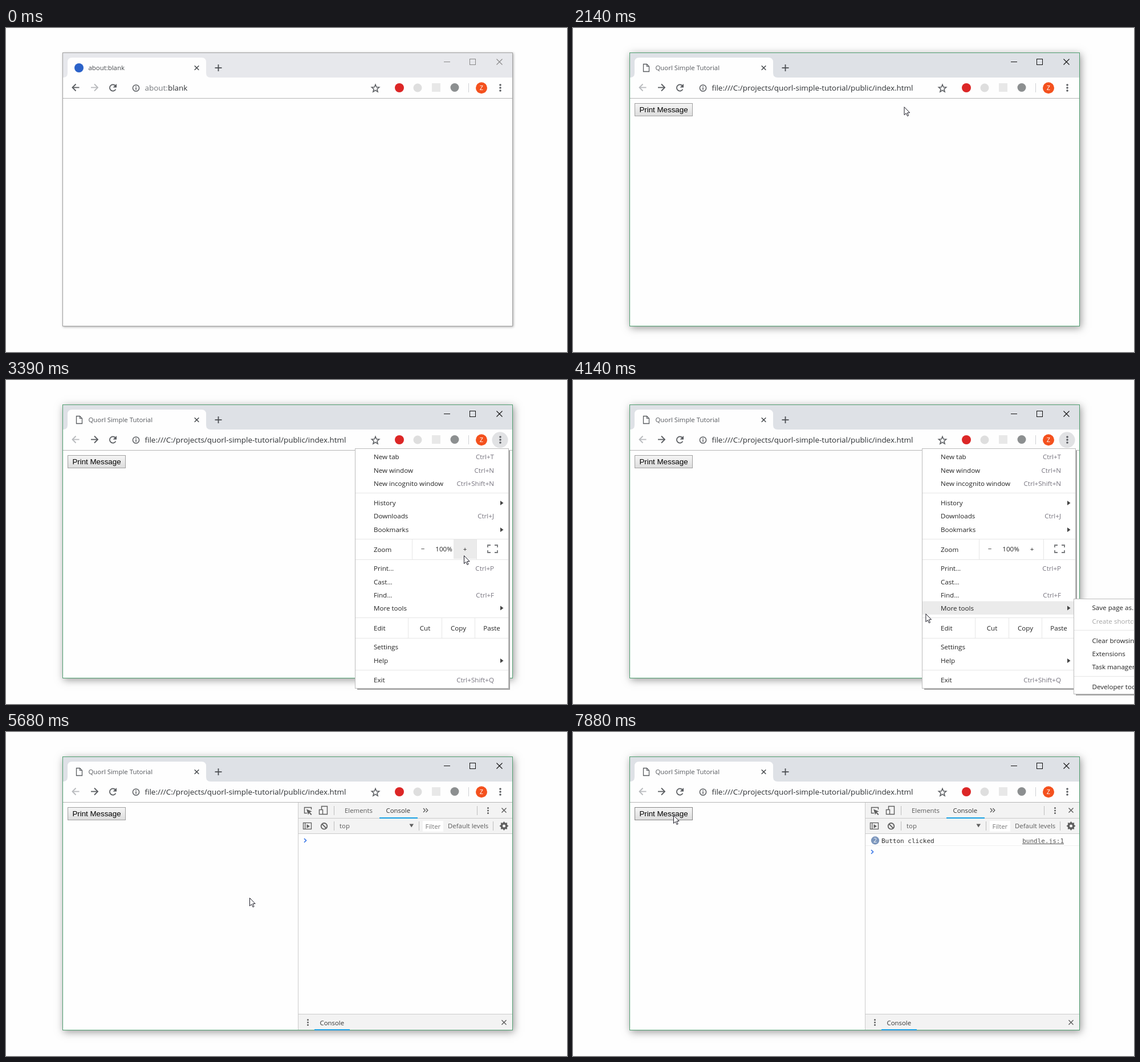
An HTML page with a canvas that plays this animation: 984 px wide and 569 px high, repeating every 8 s.

```html
<!DOCTYPE html>
<html lang="en">
<head>
<meta charset="utf-8">
<title>Browser demo</title>
<style>
  html, body { margin: 0; width: 100%; height: 100%; overflow: hidden; background: #fefefe; }
  canvas { display: block; }
</style>
</head>
<body>
<canvas id="stage" width="984" height="569"></canvas>
<script>
const ctx = document.getElementById('stage').getContext('2d');
const LOOP = 8000;
const UI = '"Open Sans", "Noto Sans", sans-serif';
const MONO = '"DejaVu Sans Mono", monospace';
const ARIAL = '"Liberation Sans", Arial, sans-serif';
const ICON = '#5a5d61';

// ---- drawing helpers ----
function rect(x, y, w, h, color) {
  ctx.fillStyle = color;
  ctx.fillRect(x, y, w, h);
}
function frame(x, y, w, h, color, width = 1) {
  ctx.strokeStyle = color;
  ctx.lineWidth = width;
  ctx.strokeRect(x, y, w, h);
}
function path(points, closed) {
  ctx.beginPath();
  points.forEach(([x, y]) => ctx.lineTo(x, y));
  if (closed) ctx.closePath();
}
function line(points, color, width = 1, closed = false) {
  path(points, closed);
  ctx.strokeStyle = color;
  ctx.lineWidth = width;
  ctx.stroke();
}
function shape(points, color) {
  path(points, true);
  ctx.fillStyle = color;
  ctx.fill();
}
function disc(x, y, r, color) {
  ctx.beginPath();
  ctx.arc(x, y, r, 0, 7);
  ctx.fillStyle = color;
  ctx.fill();
}
function ring(x, y, r, color, width, from = 0, to = 2 * Math.PI) {
  ctx.beginPath();
  ctx.arc(x, y, r, from, to);
  ctx.strokeStyle = color;
  ctx.lineWidth = width;
  ctx.stroke();
}
// y is the middle of the capital letters
function text(s, x, y, { size = 11.6, color = '#222', align = 'left', font = UI } = {}) {
  ctx.font = `${size}px ${font}`;
  ctx.fillStyle = color;
  ctx.textAlign = align;
  ctx.fillText(s, x, y + size * 0.36);
}
function cross(x, y, r, color, width) {
  line([[x - r, y - r], [x + r, y + r]], color, width);
  line([[x - r, y + r], [x + r, y - r]], color, width);
}
function plus(x, y, r, color, width) {
  line([[x - r, y], [x + r, y]], color, width);
  line([[x, y - r], [x, y + r]], color, width);
}
function dots(x, y, gap, r, color) {
  for (const k of [-1, 0, 1]) disc(x, y + k * gap, r, color);
}
function arrow(x, y, dir, color) {
  line([[x - 6 * dir, y], [x + 6 * dir, y]], color, 1.8);
  line([[x, y - 6], [x + 6 * dir, y], [x, y + 6]], color, 1.8);
}
const star = (x, y, outer, inner, n) => Array.from({ length: 2 * n }, (_, i) => {
  const r = i % 2 ? inner : outer, a = i * Math.PI / n - Math.PI / 2;
  return [x + r * Math.cos(a), y + r * Math.sin(a)];
});

// ---- pointer: [start, end, x, y, bend]; each move begins where the last one ended ----
const MOVES = [
  [0, 0, 875, 540], [140, 940, 176, 148], [980, 1480, 169, 139], [1700, 2490, 844, 98, 8],
  [2490, 2550, 860, 103], [2550, 3330, 803, 308], [3390, 4190, 617, 411],
  [4270, 4700, 950, 531], [4900, 5680, 427, 291], [5740, 6540, 176, 146]
];
const ease = p => p < 0.5 ? 2 * p * p : 1 - 2 * (1 - p) ** 2;
const clamp = p => Math.min(1, Math.max(0, p));

function pointerAt(t) {
  let x = 0, y = 0;
  for (const [start, end, toX, toY, bend = 1] of MOVES) {
    if (t < start) break;
    const p = end > start ? ease(clamp((t - start) / (end - start))) : 1;
    x += (toX - x) * p;
    y += (toY - y) * p ** bend;
  }
  return { x, y };
}
function drawPointer({ x, y }) {
  const points = [[0, 0], [0, 14], [3.2, 11], [5.6, 16], [7.6, 15], [5.3, 10.2], [9.6, 10]]
    .map(([dx, dy]) => [x + dx + 0.5, y + dy + 0.5]);
  shape(points, '#fff');
  line(points, '#1b1b26', 1, true);
}

// ---- browser window ----
function drawWindow(t) {
  const focused = t >= 980, loaded = t >= 1100;
  const glow = clamp((t - 980) / 500);
  ctx.save();
  ctx.shadowColor = `rgba(0,0,0,${0.35 + 0.05 * glow})`;
  ctx.shadowBlur = 4 + 9 * glow;
  ctx.shadowOffsetX = 1 + glow;
  ctx.shadowOffsetY = 1 + 2 * glow;
  rect(99, 43, 790, 481, '#fefefe');
  ctx.restore();

  rect(100, 44, 788, 43, focused ? '#dee1e6' : '#e7e8ec');
  ctx.fillStyle = '#fefefe';
  ctx.beginPath();
  ctx.moveTo(100, 87);
  ctx.quadraticCurveTo(108, 87, 108, 79);
  ctx.lineTo(108, 60);
  ctx.quadraticCurveTo(108, 52, 116, 52);
  ctx.lineTo(343, 52);
  ctx.quadraticCurveTo(351, 52, 351, 60);
  ctx.lineTo(351, 79);
  ctx.quadraticCurveTo(351, 87, 359, 87);
  ctx.fill();

  if (loaded) {
    line([[123.5, 63.5], [129.5, 63.5], [133.5, 67.5], [133.5, 76.5], [123.5, 76.5]], ICON, 1.3, true);
    line([[129.5, 63.5], [129.5, 67.5], [133.5, 67.5]], ICON, 1.2);
  } else {
    disc(128, 70, 8, '#2b62c9');
  }
  text(loaded ? 'Quorl Simple Tutorial' : 'about:blank', 144.5, 70,
    { size: 11.4, color: loaded ? '#55585d' : '#45484c' });
  cross(334.5, 70, 3.8, '#45484c', 1.5);
  plus(372.5, 70, 6, '#4c4f53', 1.8);

  const caption = focused ? '#111' : '#888';
  line([[768, 59.5], [779, 59.5]], caption);
  frame(813.5, 54.5, 10, 10, caption);
  cross(865.5, 59.5, 5, caption, 1.1);

  arrow(122.5, 104.5, -1, loaded ? '#b8babd' : ICON);
  arrow(155, 104.5, 1, loaded ? ICON : '#b8babd');
  ring(187.5, 105, 5.6, ICON, 1.8, 0.5, 5.5);
  shape([[194, 98], [194, 104.5], [187.5, 104.5]], ICON);
  ring(228, 105.5, 5.6, ICON, 1.5);
  rect(227.2, 104.5, 1.6, 4.2, ICON);
  rect(227.2, 102, 1.6, 1.5, ICON);

  const url = { size: 13.45, color: '#2e3134' };
  if (loaded) {
    text('file:///C:/projects/quorl-simple-tutorial/public/index.html', 243.5, 105, url);
  } else {
    text('about:', 243.5, 105, { ...url, color: '#777a7e' });
    text('blank', 243.5 + ctx.measureText('about:').width, 105, url);
  }

  line(star(648, 106.3, 7, 3, 5), ICON, 1.5, true);
  disc(690, 105, 8, '#dc2626');
  disc(722, 105, 7.5, '#dedede');
  rect(747, 97, 15, 15, '#e8e8e8');
  disc(787, 104.5, 7.5, '#8c8f90');
  line([[811.5, 97], [811.5, 113]], '#cfd1d4');
  disc(834, 105.3, 10, '#f4511e');
  text('Z', 834, 105.3, { size: 11, color: '#fff', align: 'center' });
  if (t >= 2550 && t < 4980) disc(866.5, 105.3, 14, '#e1e2e4');
  dots(867, 105, 5, 1.8, ICON);
  line([[100, 123.5], [888, 123.5]], '#b6b6b6');
  frame(99.5, 43.5, 789, 480, focused ? '#4f9f70' : '#a2a2a2');
  return loaded;
}

function drawButton(t, pointer) {
  const pressed = (t >= 7030 && t < 7150) || (t >= 7750 && t < 7880);
  const over = pointer.x > 108 && pointer.x < 210 && pointer.y > 132 && pointer.y < 155;
  const fill = ctx.createLinearGradient(0, 132, 0, 155);
  fill.addColorStop(0, pressed ? '#dadada' : '#f6f6f6');
  fill.addColorStop(1, pressed ? '#f0f0f0' : '#dcdcdc');
  rect(108, 132, 102, 23, fill);
  frame(108.5, 132.5, 101, 22, over ? '#868686' : '#a0a0a0');
  text('Print Message', 159, 143, { size: 13.33, color: '#000', align: 'center', font: ARIAL });
}

// ---- menus: [label, y, shortcut], '>' marks a submenu ----
const MENU = [
  ['New tab', 135, 'Ctrl+T'], ['New window', 159, 'Ctrl+N'],
  ['New incognito window', 182, 'Ctrl+Shift+N'], ['History', 216, '>'],
  ['Downloads', 239, 'Ctrl+J'], ['Bookmarks', 263, '>'], ['Zoom', 298], ['Print...', 331, 'Ctrl+P'],
  ['Cast...', 355], ['Find...', 378, 'Ctrl+F'], ['More tools', 400.5, '>'], ['Edit', 436],
  ['Settings', 469], ['Help', 493, '>'], ['Exit', 527, 'Ctrl+Shift+Q']
];
const TOOLS = [
  ['Save page as...', 400], ['Create shortcut...', 424], ['Clear browsing data...', 458],
  ['Extensions', 481], ['Task manager', 504], ['Developer tools', 539]
];
// [left, right, label, top, bottom]
const CELLS = [
  [713, 749, '−', 280, 314], [785, 825, '+', 280, 314], [826, 881, '', 280, 314],
  [706, 764, 'Cut', 418, 453], [765, 822, 'Copy', 418, 453], [823, 881, 'Paste', 418, 453]
];
const HOVER = '#ebebeb', RULE = '#e6e6e6';

function panel(x, y, w, h, rules) {
  rect(x + 4, y + 4, w - 2, h - 2, '#a3a3a3');
  rect(x, y, w, h, '#fff');
  frame(x + 0.5, y + 0.5, w - 1, h - 1, '#bcbcbc');
  for (const ruleY of rules) rect(x + 1, ruleY, w - 2, 1, RULE);
}

function drawMenu(pointer, toolsOpen) {
  const inTools = toolsOpen && pointer.x > 878;
  const onRow = y => Math.abs(pointer.y - y) < 11.7;
  panel(612, 120, 270, 422, [198, 279, 315, 417, 453, 509]);

  for (const [label, y, key] of MENU) {
    const split = label === 'Zoom' || label === 'Edit';
    const lit = inTools ? label === 'More tools' : !split && onRow(y);
    if (lit) rect(613, y - 12, 268, 23.5, HOVER);
    text(label, 645, y);
    if (key === '>') shape([[867, y - 4], [867, y + 4], [872.5, y]], '#444');
    else if (key) text(key, 856, y, { color: '#77747f', align: 'right' });
  }
  for (const [left, right, label, top, bottom] of CELLS) {
    const lit = !inTools && pointer.x >= left && pointer.x < right && pointer.y >= top && pointer.y < bottom;
    if (lit) rect(left, top, right - left, bottom - top, HOVER);
    text(label, (left + right) / 2, top < 300 ? 297 : 436, { align: 'center' });
  }
  for (const x of [712, 825]) rect(x, 280, 1, 35, RULE);
  for (const x of [705, 764, 822]) rect(x, 418, 1, 35, RULE);
  text('100%', 768, 297, { align: 'center' });
  for (const sx of [-1, 1]) for (const sy of [-1, 1]) {
    const x = 853.5 + 8.5 * sx, y = 296.5 + 6.5 * sy;
    line([[x - 5 * sx, y], [x, y], [x, y - 4 * sy]], '#77797c', 1.8);
  }

  if (!toolsOpen) return;
  panel(878, 384, 250, 168, [439, 520]);
  for (const [label, y] of TOOLS) {
    if (inTools && onRow(y)) rect(879, y - 11.5, 248, 22.5, HOVER);
    text(label, 910.5, y, { color: label.startsWith('Create') ? '#a6a6a6' : '#222' });
  }
}

// ---- developer panel ----
function drawPrompt(y) {
  line([[523, y - 3.3], [526.5, y], [523, y + 3.3]], '#3b78e7', 1.6);
}
function drawConsole(clicks) {
  const gray = '#5f5f5f', bar = '#f3f3f3', edge = '#cbcbcb', blue = '#169fe3';
  const label = { size: 11.4, color: '#5a5a5a' };
  rect(513, 124, 375, 399, '#fefefe');
  rect(513, 124, 375, 55, bar);
  rect(513, 496, 375, 27, bar);
  rect(512, 124, 1, 399, edge);
  for (const y of [151, 178, 495]) rect(513, y, 375, 1, edge);
  for (const [x, y] of [[575, 130], [826, 130], [575, 157], [724, 157], [854, 157]]) rect(x, y, 1, 16, '#bdbdbd');

  line([[528, 142.5], [523.5, 142.5], [523.5, 132.5], [535.5, 132.5], [535.5, 136]], gray, 1.4);
  shape([[527, 135.5], [536.5, 139.5], [532.8, 141], [536.5, 144.5], [535, 146], [531.6, 142.3], [530, 145.5]], gray);
  line([[553.5, 136], [553.5, 130.5], [563.5, 130.5], [563.5, 144.5], [556, 144.5]], gray, 1.4);
  frame(549.5, 136.5, 6, 8, gray, 1.4);
  text('Elements', 594, 138, label);
  text('Console', 666.5, 138, { ...label, color: '#333' });
  rect(655, 150, 67, 2, blue);
  for (const x of [732, 736.5]) line([[x, 134], [x + 3.3, 137.5], [x, 141]], gray, 1.4);
  dots(845.5, 138, 4.6, 1.5, gray);
  cross(873.5, 137.5, 4, gray, 1.5);

  frame(521.5, 159.5, 14, 11, gray, 1.3);
  rect(524, 160, 1.3, 11, gray);
  shape([[527.5, 162], [527.5, 169], [533, 165.5]], gray);
  ring(558, 165.3, 5.3, gray, 1.8);
  line([[554.3, 161.6], [561.7, 169]], gray, 1.8);
  text('top', 585, 165, label);
  shape([[707.5, 161.5], [715, 161.5], [711.2, 167.5]], gray);
  rect(731, 156, 36, 19, '#fff');
  text('Filter', 735.5, 166, { ...label, color: '#777' });
  text('Default levels', 775, 165, label);
  shape(star(873.5, 165, 8, 5.6, 8), gray);
  disc(873.5, 165, 5.8, gray);
  disc(873.5, 165, 2.5, bar);

  dots(529.5, 510, 4.6, 1.5, gray);
  text('Console', 550.5, 510.5, { ...label, color: '#333' });
  rect(541, 522, 62, 2, blue);
  cross(873.5, 510, 4, gray, 1.5);

  if (clicks) {
    const mono = { size: 11, font: MONO, color: '#303030' };
    if (clicks > 1) {
      disc(530, 190.5, 7.2, '#7d97bd');
      text(clicks, 530, 190.5, { size: 10.5, color: '#fff', align: 'center' });
    }
    text('Button clicked', 541, 191, mono);
    text('bundle.js:1', 861, 191, { ...mono, color: '#545454', align: 'right' });
    rect(788, 196, 73, 1, '#545454');
    rect(513, 199, 375, 1, '#f0f0f0');
  }
  drawPrompt(clicks ? 210.5 : 190.5);
}

function draw(t) {
  const pointer = pointerAt(t);
  rect(0, 0, 984, 569, '#fefefe');
  const loaded = drawWindow(t);
  if (loaded) drawButton(t, pointer);
  if (t >= 5200) drawConsole((t >= 7150) + (t >= 7880));
  if (t >= 2610 && t < 4900) drawMenu(pointer, t >= 4090);
  const hidden = t < 140 || (t >= 4900 && t < 5010);
  if (!hidden) drawPointer(pointer);
}

const begin = performance.now();
function tick() {
  draw((performance.now() - begin) % LOOP);
  requestAnimationFrame(tick);
}
tick();
</script>
</body>
</html>
```
